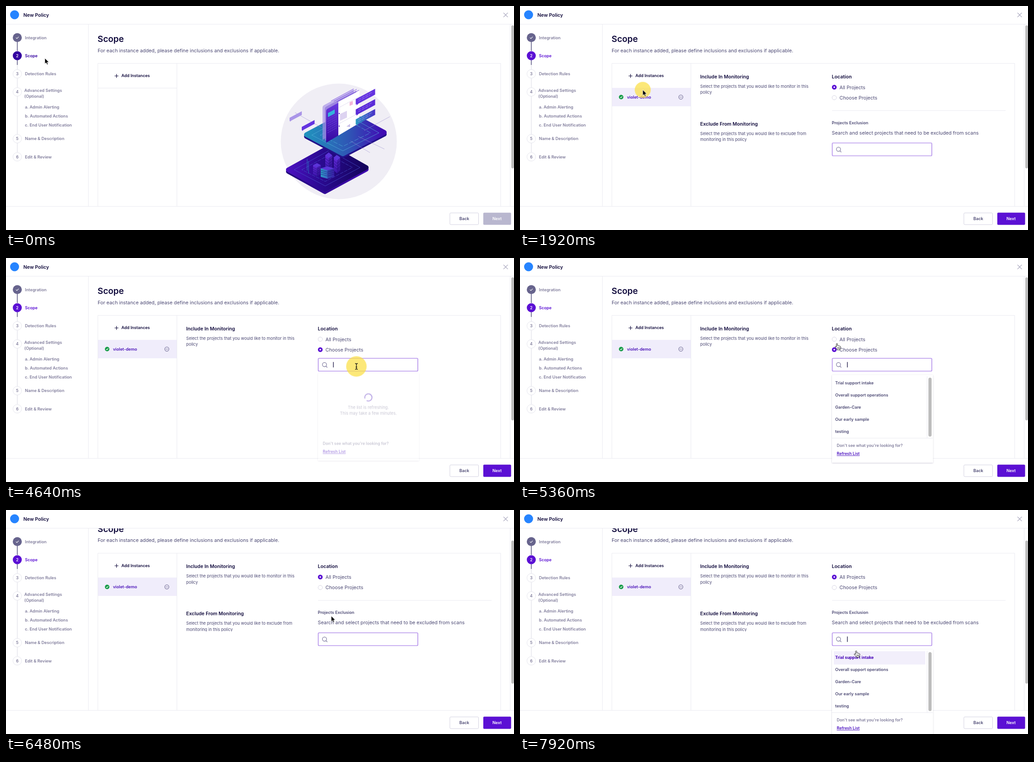
An HTML page that plays this animation: 1125x498 px, repeating every 8000 ms.

```html
<!DOCTYPE html>
<html lang="en">
<head>
<meta charset="utf-8">
<title>New Policy</title>
<style>
html,body{margin:0;width:100%;height:100%;overflow:hidden;background:#fff}
svg{display:block;width:100vw;height:100vh}
text{font:600 9.15px Inter,"Open Sans",sans-serif;fill:#4b4873}
.muted text,text.muted{fill:#807d9c}
.num text{font-size:8.8px;text-anchor:middle}
text.dark{fill:#100a3c}
text.title{font-size:19px;fill:#100a3c}
text.head{font-size:10.6px;fill:#100a3c}
text.body{font-weight:400;font-size:10.8px}
text.note{font-weight:400;font-size:9.2px}
text.small{font-size:8.85px}
text.link{fill:#4a0fc0;text-decoration:underline}
text.mid{text-anchor:middle}
text.violet{fill:#4a12b8}
text.soft{fill:#66628a}
.line{stroke:#eaeaf1;fill:none}
.icon{fill:none;stroke:#77739a;stroke-width:1.2;stroke-linecap:round}

/* Every clip lasts 8 s, so 1% is one 80 ms tick. */
.step{animation:8s step-end infinite}
.move{animation:8s linear infinite}
.active{animation-name:active}
.button-hover{animation-name:buttonHover}
.menu{animation-name:menu}
.menu-hover{animation-name:menuHover}
.empty{animation-name:empty}
.chosen{animation-name:chosen}
.every{animation-name:every}
.some{animation-name:some}
.page{animation-name:page}
.thumb{animation-name:thumb}
.picker{animation-name:picker}
.drop{animation-name:drop}
.caret{animation-name:caret}
.loading{animation-name:loading}
.items{animation-name:items}
.item-hover{animation-name:itemHover}
.cursor{animation-name:cursor;animation-timing-function:ease-in-out}
.tap{animation-name:tap}
.arrow{animation-name:arrow}
.hand{animation-name:hand}
.beam{animation-name:beam}
.spin{animation:spin 1s linear infinite}

@keyframes active{0%{fill:#3300a0}4%{fill:#5b10d4}}
@keyframes buttonHover{0%,16%{opacity:0}9%{opacity:1}}
@keyframes menu{0%,23%{opacity:0}12%{opacity:1}}
@keyframes menuHover{0%,23%{opacity:0}17%{opacity:1}}
@keyframes empty{0%{opacity:1}23%{opacity:0}}
@keyframes chosen{0%{opacity:0}23%{opacity:1}}
@keyframes every{0%,48%{opacity:0}23%,70%{opacity:1}}
@keyframes some{0%,70%{opacity:0}48%{opacity:1}}
@keyframes page{0%,74%{transform:none;animation-timing-function:ease-in-out}78%,100%{transform:translateY(-31.5px)}}
@keyframes thumb{0%,74%{transform:none;animation-timing-function:ease-in-out}78%,100%{transform:translateY(25px)}}
@keyframes picker{
  0%,47.99%{transform:translateY(81.5px)}
  48%,69.99%{transform:translateY(0)}
  70%,74%{transform:translateY(81.5px);animation-timing-function:ease-in-out}
  78%,100%{transform:translateY(50px)}
}
@keyframes drop{
  0%,56.5%,70%,86.5%{opacity:0;transform:translateY(-8px)}
  60%,69.99%,90%,100%{opacity:1;transform:none}
}
@keyframes caret{0%,70%{opacity:0}57%,87%{opacity:1}}
@keyframes loading{0%,70%{opacity:1}62%,92%{opacity:0}}
@keyframes items{0%,70%{opacity:0}62%,92%{opacity:1}}
@keyframes itemHover{0%{opacity:0}98%{opacity:1}}
@keyframes cursor{
  0%,1%{transform:translate(86px,116px)}
  10%,14.5%{transform:translate(280px,160px)}
  19%,22.5%{transform:translate(268px,187px)}
  36%{transform:translate(420px,166px)}
  38%{transform:translate(420px,166px);animation-timing-function:ease-in}
  40%{transform:translate(482px,159px);animation-timing-function:ease-out}
  45%,47.5%{transform:translate(697px,201px)}
  55%,60.5%{transform:translate(776px,241px)}
  67%{transform:translate(702px,190px);animation-timing-function:ease-out}
  68.5%,72%{transform:translate(697px,178px)}
  78%{transform:translate(712px,215px);animation-timing-function:linear}
  81%{transform:translate(720px,235px);animation-timing-function:ease-out}
  83%,95%{transform:translate(740px,287px)}
  99%,100%{transform:translate(744.5px,313px)}
}
@keyframes tap{
  0%,11%,16%,21%,25%,46%,50%,56.5%,61%,68.5%,72%,85%,89%,100%{transform:scale(0)}
  12.5%,13.5%,22.5%,23.5%,47.5%,48.5%,58.3%,59%,69.5%,70.5%,86.5%,87.5%{transform:scale(1)}
}
@keyframes arrow{0%,23%,42%,71%{opacity:1}9%,37%,45%,83%{opacity:0}}
@keyframes hand{0%,23%,51%,71%{opacity:0}9%,45%,65%,97%{opacity:1}}
@keyframes beam{0%,42%,65%,97%{opacity:0}37%,51%,83%{opacity:1}}
@keyframes spin{to{transform:rotate(360deg)}}
</style>
</head>
<body>
<svg viewBox="0 0 1125 498" preserveAspectRatio="none">
<defs>
  <clipPath id="view"><path d="M183 41H1116V445H183z"/></clipPath>
  <linearGradient id="top"><stop offset="0" stop-color="#2192bd"/><stop offset=".55" stop-color="#2f55b5"/><stop offset="1" stop-color="#4109b3"/></linearGradient>
  <linearGradient id="base"><stop offset="0" stop-color="#4a10c0"/><stop offset=".4" stop-color="#2b0a92"/><stop offset="1" stop-color="#14045c"/></linearGradient>
  <linearGradient id="rim"><stop offset="0" stop-color="#22087c"/><stop offset="1" stop-color="#430cb4"/></linearGradient>
  <linearGradient id="tower" x2="0" y2="1"><stop offset="0" stop-color="#6a2ee0"/><stop offset="1" stop-color="#3a14a8"/></linearGradient>
  <linearGradient id="sheet" x2="0" y2="1"><stop offset="0" stop-color="#6a3be0"/><stop offset="1" stop-color="#3407a0"/></linearGradient>
  <linearGradient id="teal"><stop offset="0" stop-color="#2a9cc2"/><stop offset="1" stop-color="#4a2fc8"/></linearGradient>
  <filter id="shadow" x="-10%" y="-10%" width="120%" height="120%"><feDropShadow dx="0" dy="1" stdDeviation="1.6" flood-color="#3a3560" flood-opacity=".25"/></filter>
  <path id="bubble" d="M0 23L43 0V13L6 33L2 37V34L0 35z"/>
  <g id="block"><path d="M0 0L9-5L18 0V22L9 27L0 22z"/><path d="M0 0L9 5L18 0L9-5z" fill="#5a35d8"/><path d="M9 5L18 0V22L9 27z" fill="#1c0b76" opacity=".35"/><path d="M0 5L9 10L18 5M0 10L9 15L18 10M0 15L9 20L18 15" fill="none" stroke="#1c0b76" stroke-width=".7"/></g>
  <g id="search">
    <rect x="691.5" y="223" width="220.5" height="28.5" rx="2" fill="#fff" stroke="#b592ec" stroke-width="1.7"/>
    <path class="icon" d="M708.5 240.5L711.3 243.2"/><circle class="icon" cx="705.3" cy="237" r="4.6"/>
  </g>
</defs>
<rect width="1125" height="498" fill="#fff"/>

<g clip-path="url(#view)"><g class="move page">
  <text class="title" x="202.8" y="80.3">Scope</text>
  <text class="body" x="203" y="102.8">For each instance added, please define inclusions and exclusions if applicable.</text>
  <path class="line" d="M203.5 600V127.5H1095.5V600M378.5 127.5V600M203.5 182.5H378.5"/>

  <g class="step empty">
    <circle cx="737" cy="301" r="128.5" fill="#f0eef5"/>
    <g stroke-linejoin="round" stroke-width="10">
      <path d="M625 368L717 317L798 363L706 413z" fill="url(#rim)" stroke="url(#rim)"/>
      <path d="M625 364L717 313L798 359L706 408z" fill="url(#base)" stroke="url(#base)"/>
    </g>
    <g fill="none" stroke="#4a55d0" stroke-width=".7">
      <path d="M638 364L716 321L784 359L707 400z"/><path d="M655 364L716 331L767 359L707 390z" stroke-dasharray="8 2"/>
      <path d="M667 340V366M670 345V372" stroke="#25a5c8"/>
    </g>
    <g fill="url(#tower)">
      <use href="#block" transform="translate(707 332)scale(.85 1.25)"/><use href="#block" transform="translate(726 337)scale(.78 1.3)"/>
      <use href="#block" transform="translate(680 354)scale(.95 .9)"/>
    </g>
    <use href="#block" transform="translate(697 361)scale(1.65 .85)" fill="url(#teal)"/>
    <g stroke-linejoin="round" stroke-width="10">
      <path d="M665 290L757 239L838 285L746 333z" fill="#23118a" stroke="#23118a"/>
      <path d="M665 286L757 237L838 281L746 329z" fill="url(#top)" stroke="url(#top)"/>
    </g>
    <g fill="none" stroke="#57b4dd" stroke-width=".7">
      <path d="M677 287L757 243L826 282L746 322z"/><path d="M696 287L757 254L807 282L746 312z" stroke-dasharray="10 3"/>
      <path d="M640 237L700 271M780 290L838 318M763 300L806 326M793 277L850 246" stroke="#9b8fd0" stroke-width=".6"/>
    </g>
    <path d="M701 226Q701 222 705 220L770 185V255L701 298z" fill="#a78fe6" opacity=".65"/>
    <path d="M706 229Q706 225 710 223L776 188V258L706 300z" fill="#9278dd" opacity=".75"/>
    <path d="M720 211L770 184M726 212L777 185M732 213L782 187" fill="none" stroke="#6c3be0" stroke-width=".8"/>
    <path d="M736 213L783 188V260L736 288z" fill="#fff"/>
    <path d="M709 234Q709 230 713 228L736 215V288L709 304z" fill="url(#sheet)"/>
    <path d="M713 238L728 230V239L713 247z" fill="#35b3dc"/>
    <path d="M712 252L732 241M712 257L732 246M712 262L732 251M712 267L732 256M712 272L732 261M712 277L732 266M712 282L732 271" stroke="#6a43d8" stroke-dasharray="4 1"/>
    <path d="M740 240L755 233V248L740 255z" fill="#ddd3f1"/><path d="M761 214L768 211V219L761 222z" fill="#f4b6d8"/><path d="M754 268L762 262V269z" fill="#cabfe8"/>
    <path d="M737 226L783 201M737 262L783 237" stroke="#e2ddf0"/>
    <g fill="#4510b8"><circle cx="738" cy="239" r="1.2"/><circle cx="738" cy="267" r="1.2"/></g>
    <use href="#bubble" x="774.5" y="184" fill="#6433e0"/><use href="#bubble" x="774.5" y="207" fill="#5a2ad8"/><use href="#bubble" x="774.5" y="229" fill="url(#teal)"/>
    <use href="#bubble" transform="translate(628 234)scale(.63)" fill="#aa95e8"/><use href="#bubble" transform="translate(655 253.5)scale(.66)" fill="#6433e0"/>
    <path d="M780 208L812 191M780 212L806 198M780 231L812 214M780 235L806 221M780 253L812 236M780 257L806 243" stroke="#b7a0f5" stroke-width=".7" stroke-dasharray="7 2"/>
  </g>

  <rect class="step button-hover" x="231" y="141.5" width="98.5" height="27" rx="2" fill="#f2effb"/>
  <path d="M240.5 155.5H249M244.8 151.2V159.8" stroke="#100a3c" stroke-width="1.2"/>
  <text class="dark" x="255.5" y="158.3">Add Instances</text>

  <g class="step chosen">
    <path d="M204 182H378V223H204z" fill="#f0edfb"/>
    <circle cx="224" cy="202.5" r="5" fill="#179c48"/>
    <path d="M221.7 202.6L223.4 204.2L226.4 201" fill="none" stroke="#fff" stroke-width="1.2"/>
    <text class="violet" x="237" y="205.6">violet-demo</text>
    <circle class="icon" cx="356.2" cy="202.5" r="4.6"/><path class="icon" d="M354 202.5H358.4"/>
    <text class="head" x="399" y="160.5">Include In Monitoring</text>
    <text class="note" x="399" y="181.7">Select the projects that you would like to monitor in this</text>
    <text class="note" x="399" y="195.2">policy</text>
    <text class="head" x="690.5" y="160.5">Location</text>
    <g fill="#fff" stroke="#d5d3e2"><circle cx="696" cy="180.5" r="4.8"/><circle cx="696" cy="203.8" r="4.8"/></g>
    <text class="body" x="707.5" y="184.5">All Projects</text>
    <text class="body" x="707.5" y="207.8">Choose Projects</text>
  </g>
  <circle class="step some" cx="696" cy="203.8" r="3.5" fill="#fff" stroke="#5b10d4" stroke-width="3.5"/>
  <g class="step every">
    <circle cx="696" cy="180.5" r="3.5" fill="#fff" stroke="#5b10d4" stroke-width="3.5"/>
    <path class="line" d="M691 232.5H1075.5"/>
    <text class="head" x="399" y="265.5">Exclude From Monitoring</text>
    <text class="note" x="399" y="286.5">Select the projects that you would like to exclude from</text>
    <text class="note" x="399" y="300">monitoring in this policy</text>
    <text x="690.5" y="262.8">Projects Exclusion</text>
    <text class="body" x="690.5" y="285.7">Search and select projects that need to be excluded from scans</text>
  </g>
</g></g>

<path class="line" d="M0 40.5H1125M182.5 40.5V445.5M0 445.5H1125M1116.5 41V445"/>
<rect class="move thumb" x="1119" y="43" width="6" height="318" rx="3" fill="#bdbdbd"/>
<circle cx="19" cy="19.5" r="10" fill="#2684ff"/>
<text class="head" x="38.5" y="23.5">New Policy</text>
<path class="icon" d="M1102 15.3L1111 24.3M1111 15.3L1102 24.3" style="stroke:#a5a3bb"/>

<path d="M25 80V100M25 120V131" stroke="#5d5a85" stroke-width="1.6"/>
<path d="M25 131V141M25 161V181M25 201V285M25 305V325" stroke="#e4e4ec" stroke-width="1.4"/>
<circle cx="25" cy="70.3" r="10" fill="#67648d"/>
<path d="M22 70.4L24.2 72.5L28 68.4" fill="none" stroke="#fff" stroke-width="1.1"/>
<circle class="step active" cx="25" cy="110.5" r="10"/>
<g fill="#fff" stroke="#e4e4ec"><circle cx="25" cy="150.8" r="9.6"/><circle cx="25" cy="191" r="9.6"/><circle cx="25" cy="295" r="9.6"/><circle cx="25" cy="335.3" r="9.6"/></g>
<g class="num muted">
  <text x="25" y="113.7" style="fill:#fff">2</text><text x="25" y="154">3</text><text x="25" y="194.2">4</text><text x="25" y="298.2">5</text><text x="25" y="338.5">6</text>
</g>
<text class="step active" x="42" y="113.8">Scope</text>
<g class="muted">
  <text x="42" y="73.5">Integration</text>
  <text x="42" y="154">Detection Rules</text>
  <text x="40.5" y="191">Advanced Settings</text>
  <text x="40.5" y="204.3">(Optional)</text>
  <text x="42" y="227.8">a. Admin Alerting</text>
  <text x="42" y="247.9">b. Automated Actions</text>
  <text x="42" y="268">c. End User Notification</text>
  <text x="42" y="298.2">Name &amp; Description</text>
  <text x="42" y="338.5">Edit &amp; Review</text>
</g>

<rect x="983" y="460" width="63.5" height="26" rx="2" fill="#fff" stroke="#d3d1e0"/>
<text class="mid" x="1014.8" y="476">Back</text>
<rect x="1057" y="459.5" width="61.5" height="27" rx="2" fill="#b9b7cf"/>
<rect class="step chosen" x="1057" y="459.5" width="61.5" height="27" rx="2" fill="#5b10d4"/>
<text class="mid" x="1087.5" y="476" style="fill:#fff">Next</text>

<g class="step menu">
  <rect x="231" y="170.5" width="166.5" height="98" rx="1" fill="#fff" filter="url(#shadow)"/>
  <rect class="step menu-hover" x="234" y="175" width="161" height="28" fill="#f2effb"/>
  <text class="soft" x="238" y="192.3">violet-demo</text>
  <text class="soft" x="238" y="222.7">techmaplerun</text>
  <text class="soft" x="238" y="252.8">crew-maplerun</text>
</g>

<g class="step chosen"><g class="move picker">
  <use href="#search"/>
  <path class="step caret" d="M725 231.3V243.3" stroke="#100a3c" stroke-width="1.3"/>
  <g class="move drop">
    <rect x="691" y="260" width="223.5" height="195" rx="1" fill="#fff" filter="url(#shadow)"/>
    <g class="step loading">
      <g transform="translate(802.5 314.5)"><path class="spin" d="M3-7.4A8 8 0 1 1-3-7.4" fill="none" stroke="#5a2fc0" stroke-width="1.8"/></g>
      <text class="note mid muted" x="802.5" y="339.5">The list is refreshing.</text>
      <text class="note mid muted" x="802.5" y="353">This may take a few minutes.</text>
    </g>
    <g class="step items">
      <path class="line" d="M691 400.5H914M901.5 263V400"/>
      <rect x="904.5" y="266" width="7" height="131" rx="3.5" fill="#bcbcbc"/>
      <rect class="step item-hover" x="695" y="264" width="202.5" height="29.5" fill="#f2effb"/>
      <text x="698" y="281.3">Trial support intake</text>
      <text class="step item-hover" x="698" y="281.3" style="fill:#5b10d4">Trial support intake</text>
      <text x="698" y="308.2">Overall support operations</text>
      <text x="698" y="335">Garden-Care</text>
      <text x="698" y="361.8">Our early sample</text>
      <text x="698" y="388.6">testing</text>
    </g>
    <text class="small muted" x="701.5" y="420.3">Don't see what you're looking for?</text>
    <text class="small link" x="701.5" y="438.2">Refresh List</text>
  </g>
</g></g>

<g class="move cursor">
  <circle class="move tap" r="27" fill="#fbdf45" opacity=".72"/>
  <path class="step arrow" d="M0 0V12.5L2.9 9.9L4.9 14.4L7 13.5L5.1 9.1H9z" fill="#000" stroke="#fff" stroke-width=".8"/>
  <g class="step hand" stroke="#111" stroke-width="1" stroke-linejoin="round" stroke-linecap="round">
    <path d="M-1.4 1.3C-1.4-.4 1.2-.4 1.2 1.3V5C2 4.2 3.6 4.6 3.6 5.6C4.4 4.9 6 5.4 6 6.3C7 5.9 8.2 6.5 8.1 7.7C8.1 10 7.8 11 6.8 12.5V14.3H.4V13C-1.2 11.6-2.6 9.9-4.2 8C-4.9 6.7-3.1 6-1.4 7.8z" fill="#fff"/>
    <path d="M1.6 8.8V11.6M3.6 8.8V11.6M5.6 8.8V11.6" stroke-width=".8"/>
  </g>
  <path class="step beam" d="M-3-6.5Q0-6.5 0-4.5Q0-6.5 3-6.5M0-4.5V4.5M-3 6.5Q0 6.5 0 4.5Q0 6.5 3 6.5M-1.6 1.5H1.6" fill="none" stroke="#111" stroke-width="1.3"/>
</g>
</svg>
</body>
</html>
```
